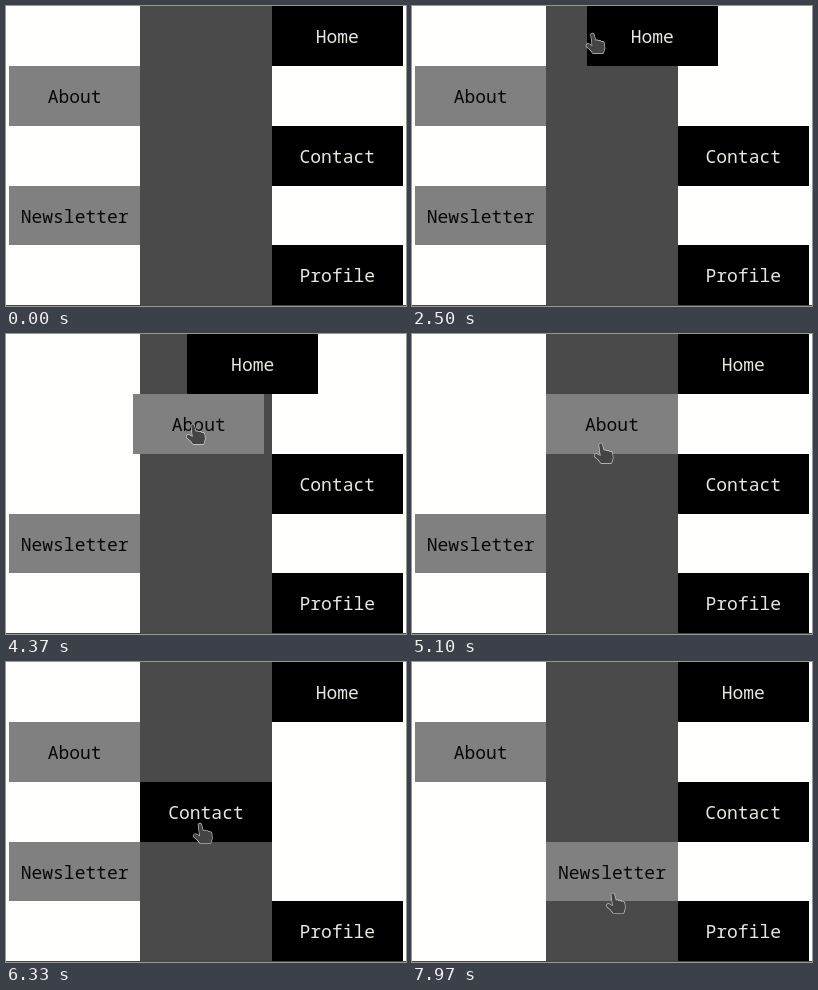
An HTML page with a canvas that plays this animation: 400x300 px, repeating every 8 s.

```html
<!DOCTYPE html>
<html lang="en">
<head>
<meta charset="utf-8">
<title>Sliding menu</title>
<style>
html, body { margin: 0; width: 100%; height: 100%; overflow: hidden; background: #fefefd; }
canvas { display: block; }
</style>
</head>
<body>
<canvas id="stage" width="400" height="300"></canvas>
<script>
const LOOP = 8000, LEFT = 3, COL = 131.3, ROW = 59.85;
const SLIDE_IN = 800, SLIDE_OUT = 300, OUT_DELAY = 500;
const ctx = document.getElementById("stage").getContext("2d");

const labels = ["Home", "About", "Contact", "Newsletter", "Profile"];
const hovers = [2175, 3803, 5520, 7182]; // time the pointer enters each row

// Height of the pointing hand: time, y
const handStops = [
  [hovers[0], 0], [2500, 27], [hovers[1], 60], [4370, 90],
  [hovers[2], 120], [5870, 151], [hovers[3], 180], [7370, 210], [LOOP, 232]
];

const arrowShape = new Path2D("M0 0V17L4 14L6 19L10 17L7.5 12.5H13Z");
const handShape = new Path2D(
  "M-1.8 1.5Q-.5-.8 1.2 1.2L2.8 7.5Q4.5 6.5 5.5 8Q7.5 7 8.5 8.8Q11 8 11.5 10.5" +
  "L12 15L10.5 20H0Q-2 16.5-6.2 13.5Q-7 10.5-4 11L-.3 13Z");

// The CSS "ease" curve, cubic-bezier(.25, .1, .25, 1)
function ease(p) {
  if (!(p > 0)) return 0;
  if (p >= 1) return 1;
  let lo = 0, hi = 1, s;
  for (let i = 0; i < 20; i++) {
    s = (lo + hi) / 2;
    const x = .75 * s * (1 - s) + s ** 3;
    if (x < p) lo = s; else hi = s;
  }
  return .3 * s * (1 - s) ** 2 + 3 * s * s * (1 - s) + s ** 3;
}

function fillBox(x0, y0, x1, y1, color) {
  const [l, t, r, b] = [x0, y0, x1, y1].map(Math.round);
  ctx.fillStyle = color;
  ctx.fillRect(l, t, r - l, b - t);
}

// An item slides to the middle on hover and back some time after the next hover
function drawItem(label, row, t) {
  const shift = ease((t - hovers[row]) / SLIDE_IN)
    - ease((t - hovers[row + 1] - OUT_DELAY) / SLIDE_OUT);
  const dark = row % 2 === 0;
  const side = dark ? 2 : 0;
  const x = LEFT + COL * (side + (1 - side) * shift);
  const y = row * ROW;
  fillBox(x, y, x + COL, y + ROW, dark ? "#000" : "#808080");
  ctx.fillStyle = dark ? "#e8e8e0" : "#080808";
  ctx.fillText(label, x + COL / 2, Math.round(y) + 37);
}

function drawPointer(shape, x, y) {
  ctx.save();
  ctx.translate(x, y);
  ctx.fillStyle = "#444";
  ctx.strokeStyle = "#d4d4d4";
  ctx.lineWidth = 1.2;
  ctx.lineJoin = "round";
  ctx.stroke(shape);
  ctx.fill(shape);
  ctx.restore();
}

function drawArrow(t) {
  const d = (t - 1230) / 50; // brief dip in from above
  drawPointer(arrowShape, 1 + d, -3 - d * d);
}

function drawHand(t) {
  const i = handStops.findIndex(stop => stop[0] > t);
  if (i < 1) return;
  const [t0, y0] = handStops[i - 1], [t1, y1] = handStops[i];
  const y = y0 + (y1 - y0) * (t - t0) / (t1 - t0);
  drawPointer(handShape, 178 + y / 10, y);
}

function draw(t) {
  fillBox(0, 0, 400, 300, "#fefefd");
  fillBox(LEFT + COL, 0, LEFT + 2 * COL, 299, "#4a4a4a");
  ctx.font = "18px 'Noto Sans Mono', monospace";
  ctx.textAlign = "center";
  labels.forEach((label, row) => drawItem(label, row, t));
  fillBox(0, 299, 400, 300, "#444449");
  drawArrow(t);
  drawHand(t);
}

const start = performance.now();
function tick() {
  draw((performance.now() - start) % LOOP);
  requestAnimationFrame(tick);
}
tick();
</script>
</body>
</html>
```
